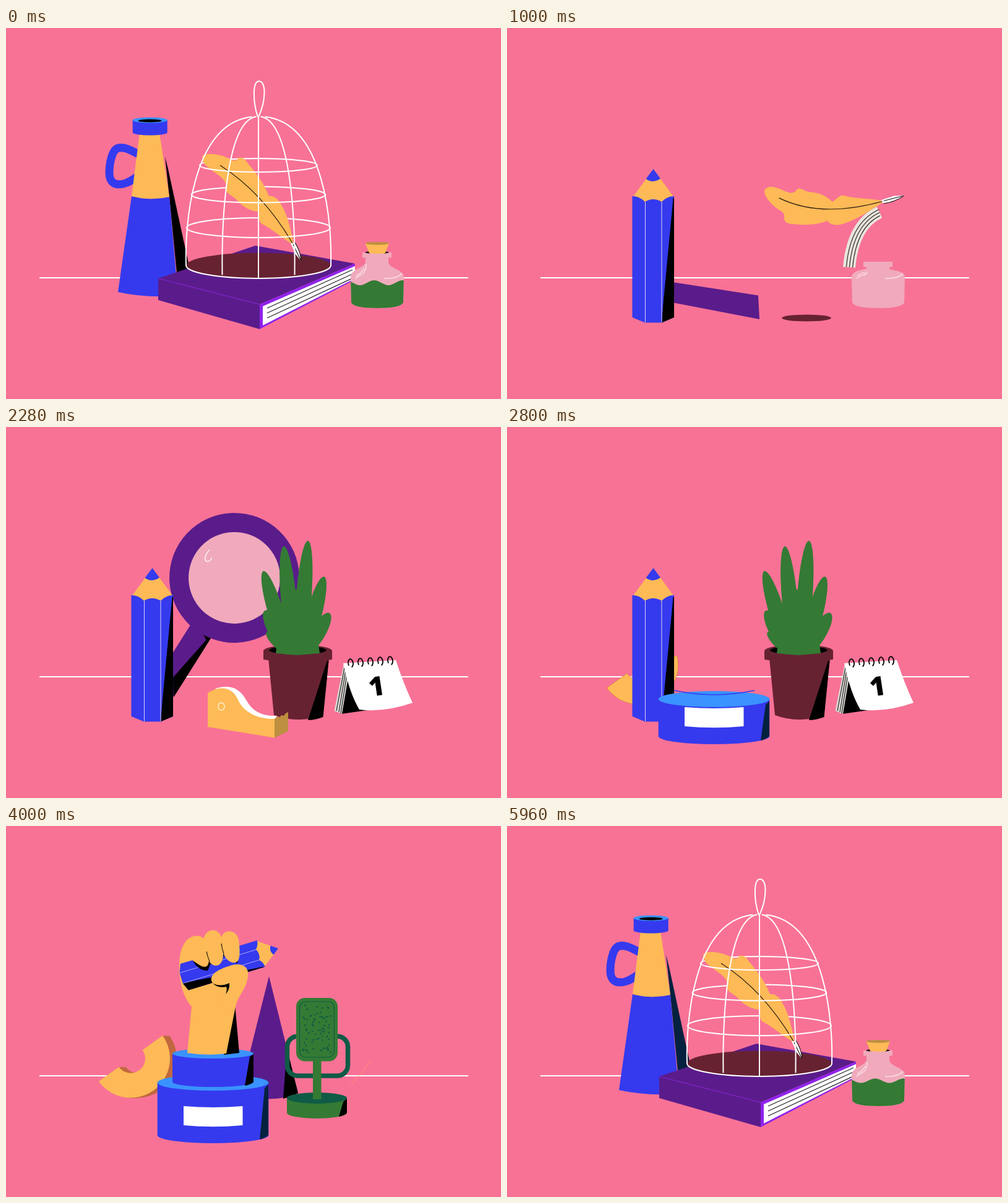
An HTML page with a canvas that plays this animation: 800x600 px, repeating every 6000 ms.

```html
<!DOCTYPE html>
<html lang="en">
<head>
<meta charset="utf-8">
<title>Writer's desk</title>
<style>
html, body { margin: 0; width: 100%; height: 100%; overflow: hidden; background: #f87296; }
canvas { display: block; }
</style>
</head>
<body>
<canvas id="stage" width="800" height="600"></canvas>
<script>
const c = document.getElementById('stage').getContext('2d');
const PINK = '#f87296', BLUE = '#353aee', SKY = '#3a93ff', GOLD = '#fdba56', OCHRE = '#bd8f3f',
  PURPLE = '#5a1c8b', VIOLET = '#9122ec', WINE = '#672232', GREEN = '#347a34', PINE = '#0f5b46',
  GLASS = '#f0aabc', NAVY = '#04213f', RUST = '#c0683f', BLACK = '#000', WHITE = '#fff';
const LOOP = 6000, RAD = Math.PI / 180;
let t = 0, u = 0; // u continues past the loop end for the first set of objects

const lerp = (a, b, k) => a + (b - a) * k;
const span = (v, a, b) => Math.min(1, Math.max(0, (v - a) / (b - a)));
const lin = x => x;
const outQuad = x => 1 - (1 - x) ** 2;
const outCubic = x => 1 - (1 - x) ** 3;
const inOut = x => x < .5 ? 4 * x ** 3 : 1 - (2 - 2 * x) ** 3 / 2;
const outBack = x => 1 + 2.5 * (x - 1) ** 3 + 1.5 * (x - 1) ** 2;
const inBack = x => x * x * (2.1 * x - 1.1);
const tw = (v, a, b, ease = inOut) => ease(span(v, a, b));
const life = (v, a, b, x, y, enter = outBack, leave = inBack) =>
  v < x ? tw(v, a, b, enter) : 1 - tw(v, x, y, leave);

function fill(color, d) { c.fillStyle = color; c.fill(new Path2D(d)); }
function line(color, w, d) { c.strokeStyle = color; c.lineWidth = w; c.stroke(new Path2D(d)); }
function oval(color, x, y, rx, ry) {
  c.fillStyle = color;
  c.beginPath(); c.ellipse(x, y, Math.max(0, rx), Math.max(0, ry), 0, 0, 7); c.fill();
}
function arc(x, y, rx, ry, a, b, w = 2) {
  c.strokeStyle = WHITE; c.lineWidth = w;
  c.beginPath(); c.ellipse(x, y, rx, ry, 0, a, b); c.stroke();
}
function trim(color, w, d, len, k) {
  if (k <= 0) return;
  c.setLineDash([len * k, 2000]);
  line(color, w, d);
  c.setLineDash([]);
}
function grow(x, y, sx, sy, draw) {
  if (sx <= .005 || sy <= .005) return;
  c.save();
  c.translate(x, y); c.scale(sx, sy); c.translate(-x, -y);
  draw();
  c.restore();
}
function drum(side, lid, x, top, bottom, rx, ry) {
  fill(side, `M${x - rx},${top}V${bottom}A${rx},${ry} 0 0 0 ${x + rx},${bottom}V${top}Z`);
  oval(lid, x, top, rx, ry);
}
const quad = p => 'M' + p.map(q => q.join()).join('L') + 'Z';

function megaphone() {
  const s = life(u, 4450, 4680, 6420, 6650);
  grow(234, 430, 1, s, () => {
    const k = life(u, 4620, 5250, 6300, 6480, outQuad, lin);
    trim(BLUE, 13, 'M214,239C204,246 198,250 190,252C176,255 167,250 167,234C167,220 171,196 182,194C192,192 202,198 216,205', 142, k);
    fill(t > 3000 ? NAVY : BLACK, 'M257,208L262,228 297,390 276,397 264,273Z');
    fill(BLUE, 'M203,272Q234,280 264,273L278,433Q225,437 181,427Z');
    fill(GOLD, 'M216,170H248L264,273Q234,280 203,272Z');
    const h = life(u, 4580, 4980, 6330, 6480, outQuad);
    const top = lerp(169, 149, h);
    if (h > .02) {
      drum(BLUE, SKY, 232.7, top, 169, 28, 4.5);
      oval(BLACK, 232.7, top + 1, 19, 2.6);
    }
  });
}

function book() {
  if (u > 7040) return;
  const top = life(u, 4660, 5060, 6400, 6680, outQuad, inOut);
  const pages = life(u, 4540, 4700, 6560, 6780, outQuad, inOut);
  const face = tw(u, 4450, 4650, outCubic), fold = tw(u, 6600, 6960);
  if (top > 0) {
    const dx = 157 * top, dy = -53 * top, ry = -66 * top;
    fill(PURPLE, quad([[246, 405], [246 + dx, 405 + dy], [410 + 154 * top, 447 + ry], [410, 447]]));
  }
  if (pages > 0) {
    grow(410, 447, pages, lerp(.6, 1, pages), () => {
      fill(VIOLET, 'M410,447L564,381V407L410,487Z');
      fill(WHITE, 'M415,450L564,385V405L415,481Z');
      for (let y = 453; y < 475; y += 8) line('#222', 1.2, `M422,${y}L560,${391 + (y - 453) * .85}`);
    });
  }
  if (face > 0) {
    const from = [[246, 405], [410, 447], [410, 487], [246, 440]];
    const to = [[258, 409.5], [406, 432.5], [408, 471], [252, 441]];
    const p = from.map((q, i) => [lerp(246, lerp(q[0], to[i][0], fold), face),
      lerp(i < 2 ? 405 : 440, lerp(q[1], to[i][1], fold), face)]);
    fill(PURPLE, quad(p));
    if (fold === 0) line(VIOLET, .8, `M${p[0]}L${p[1]}`);
  }
}

function feather() {
  const turn = tw(u, 6450, 7000), fly = span(u, 7000, 7340);
  const s = tw(u, 4930, 5420, outBack) * lerp(1, .97, turn) * (1 - fly ** 3);
  if (s <= .01) return;
  const cos = Math.cos(46.6 * RAD), sin = Math.sin(46.6 * RAD);
  // flips the plume across its axis and bows it as it turns
  const warp = d => d.replace(/([\d.]+),([\d.]+)/g, (_, px, py) => {
    const x = px - 476, y = py - 376;
    const along = x * cos + y * sin, across = y * cos - x * sin;
    const a = 231 + along;
    const slide = 14 * turn * Math.sin(Math.PI * span(a, 0, 231));
    const bow = 10 * turn * Math.sin(Math.PI * span(a, 30, 205));
    return `${along - slide},${across * lerp(1, -1.08, turn) + bow}`;
  });
  c.save();
  c.translate(lerp(476, 640, turn) + 135 * fly, lerp(376, 271, turn) + 8 * fly);
  c.rotate((lerp(46.6, 2.3, turn) - 25 * (1 - tw(u, 4930, 5500, outBack))) * RAD);
  c.scale(s, s);
  fill(GOLD, warp('M465,350C452,345 432,326 414,317C407,313 410,303 408,297C395,296 383,290 372,277C362,268 353,267 356,258C357,248 348,241 338,234C326,225 317,220 317,208C321,201 346,203 364,213C370,216 374,214 376,210C382,208 387,213 391,219C405,236 417,251 425,272C432,271 440,276 445,286C456,304 461,330 465,350Z'));
  fill(WHITE, warp('M460,348L467,347Q476,361 477,377L468,366Z'));
  line('#2a1a10', 1.2, warp('M346,222Q415,266 463,348'));
  line(BLACK, 1, warp('M464,350L476,375M467,347Q476,361 477,377'));
  c.restore();
}

function sheet() {
  const s = life(u, 6740, 6960, 7020, 7230, outBack, lin);
  grow(552, 400, s, s, () => {
    const curve = o => `M${553 + o},${387 + o * .14}Q${559 + o},${318 + o * .7} ${602 + o * .15},${298 + o}`;
    line('#e8e4dc', 20, curve(0));
    [-4.5, .5, 5.5].forEach(o => line('#222', 1.1, curve(o)));
  });
}

function cage() {
  if (u > 7060 || u < 4400) return;
  const move = tw(u, 6500, 6960), k = tw(u, 4560, 4880, lin);
  oval(WINE, lerp(408, 484, move), lerp(384, 469, move), lerp(117, 40, move) * k, lerp(20.5, 5.5, move) * k);

  const rise = life(u, 4720, 5060, 6320, 6580, outBack, inOut);
  const on = u > 4540 && u < 6720;
  const rings = [[222, 95, 11], [269.5, 108.5, 13], [323, 116, 16]].map(r =>
    [lerp(383, r[0], rise), lerp(117, r[1], rise), lerp(21, r[2], rise)]);
  if (on) rings.forEach(r => arc(408, ...r, Math.PI, 2 * Math.PI));
  sheet();
  feather();
  if (!on) return;
  rings.forEach(r => arc(408, ...r, 0, Math.PI));
  arc(408, 384, 117, 21, 0, Math.PI);
  const ribs = [[-1, 4610], [-.5, 4505], [0, 4465], [.5, 4442], [1, 4430]];
  ribs.forEach(([w, at], i) => {
    const base = 384 + 20 * (1 - Math.abs(w)) ** .4;
    const x = m => 408 + w * m;
    const d = `M${x(117)},${base}C${x(119)},320 ${x(108)},143 408,143`;
    const len = [285, 272, 261, 272, 285][i];
    trim(WHITE, 2, d, len, life(u, at, at + 300, 6420 + i * 15, 6640 + i * 15, lin, inOut));
  });
  trim(WHITE, 2, 'M407,144C399,120 398,86 409,86C421,86 420,118 408,144', 125,
    life(u, 4880, 5090, 6300, 6450, outQuad, inOut));
}

function bottle() {
  const s = life(u, 4440, 4680, 7020, 7240);
  grow(600, 453, lerp(.7, 1, Math.min(1, s)), s, () => {
    const n = 15 * (1 - life(u, 4800, 5120, 6450, 6900, outBack, inOut));
    const body = `M581,${370 + n}V${377 + n * .75}C581,${389 + n * .2} 557,${388 + n * .1} 557,404L558,444Q562,453 600,453Q638,453 642,444L643,402C642,${390 + n * .1} 618,${389 + n * .2} 618,${378 + n * .75}V${370 + n}Z`;
    fill(GLASS, body);
    fill(GLASS, `M576,${363 + n}H623V${371.5 + n}H576Z`);
    const full = life(u, 4480, 4700, 6400, 6850, outQuad, inOut);
    if (full > 0) {
      oval(BLACK, 599.5, 363 + n, 19, 2);
      oval(GLASS, 599.5, 363.5 + n, 13, 2.4);
      const level = lerp(456, lerp(419, 412, tw(u, 4700, 5000)), full);
      const amp = 4 + 1.5 * Math.sin(t / LOOP * 12 * Math.PI);
      c.save();
      c.clip(new Path2D(body));
      c.fillStyle = GREEN;
      c.beginPath();
      for (let x = 555; x <= 645; x += 2) c.lineTo(x, level + amp * Math.sin((x - 560.5) / 46 * 2 * Math.PI));
      c.lineTo(645, 460); c.lineTo(555, 460);
      c.fill();
      c.restore();
    }
    line('#fde6ec', 1.3, `M565,405C571,398 582,401 582,${382 + n * .8}M566,401Q576,395 579,${388 + n * .5}M611,405Q632,406 640,397`);
    const k = life(u, 5050, 5300, 6330, 6500);
    grow(600, 362 + n, k, k, () => {
      fill(GOLD, 'M580.5,348H619L613,364Q600,366 587,364Z');
      oval(OCHRE, 599.8, 348.3, 19, 2.4);
    });
  });
}

function magnifier() {
  if (t < 1040 || t > 2760) return;
  const swing = life(t, 1040, 1480, 2350, 2640, outBack, inBack);
  const g = life(t, 1080, 1420, 2400, 2610, outBack, inBack);
  const len = 153 * (1 - tw(t, 2560, 2740));
  c.save();
  c.translate(255, 425);
  c.rotate(lerp(9.4, -57.8, swing) * RAD);
  c.fillStyle = PURPLE;
  c.fillRect(0, -19.5, len, 39);
  if (g > .01) {
    c.globalAlpha = Math.min(1, Math.max(0, swing));
    fill(BLACK, 'M111,4L115,20 -2,20 25,2 105,15Z');
    c.globalAlpha = 1;
    const x = lerp(150, 214, g);
    oval(PURPLE, x, 0, 105 * g, 105 * g);
    oval(GLASS, x, 0, 74 * g, 74 * g);
    if (g > .95) line(WHITE, 1.3, 'M231,-58C222,-60 211,-58 213,-51Q216,-47 222,-48');
  }
  c.restore();
}

function pencil() {
  const s = tw(t, 600, 940, outBack);
  if (s <= 0 || t > 4600) return;
  const e = tw(t, 2950, 3600);
  c.save();
  c.translate(lerp(236.5, 440, e), lerp(228, 198, e) - 100 * Math.sin(Math.PI * e) + 249 * (1 - s));
  c.rotate(73 * e * RAD);
  c.scale(lerp(1, .66, e), lerp(1, .66, e) * s);
  c.translate(-236.5, -228);
  fill(GOLD, 'M203,274L236.5,228 270,274 250,284H223Z');
  fill(BLUE, 'M236.5,228L248,243.5Q236,252 224.5,244Z');
  fill(BLUE, 'M202.5,272Q214,272 223,281Q236,273 250,281Q259,272 270,272V468L250,476.5H223L202.5,468Z');
  fill(BLACK, 'M270,274V468L250,476.5 253,440 268.5,276Z');
  line('#dcd0f8', 1, 'M223.5,281V476M250,281V476');
  c.restore();
}

function tape() {
  grow(390, 500, 1, life(t, 1200, 1500, 2440, 2650), () => {
    fill(WHITE, 'M338,423C364,415 378,424 388,441C398,460 414,468 438,467L434,474 400,472 365,440Z');
    fill(GOLD, 'M326,430C347,417 366,421 375,441C383,461 408,473 434,472V502.5L326,485Z');
    fill(OCHRE, 'M434,472L439,468 442,470 445,466 449,467 452,463 456,461V492L434,502.5Z');
    c.strokeStyle = '#fff0d0'; c.lineWidth = 1.4;
    c.beginPath(); c.ellipse(348, 452, 5.2, 6.2, 0, 0, 7); c.stroke();
  });
}

function plant() {
  grow(472, 474, 1, life(t, 1050, 1370, 3000, 3200), () => {
    fill(WINE, 'M424,374L433,466Q470,480 512,467L522,374Z');
    fill(BLACK, 'M521.5,378L512.5,469Q500,474 488,474L519,378Z');
    fill(WINE, 'M416,362V376Q470,386 527,376V362Z');
    oval(WINE, 471.5, 362, 55.5, 10);
    oval(BLACK, 471.5, 361, 46.5, 6.8);
    const open = tw(t, 1620, 1960, outBack);
    const g = (.77 + .23 * open) * life(t, 1220, 1520, 2880, 3080);
    if (g <= .01) return;
    const s = .45 + .55 * open;
    const at = (x, y) => [470 + (x - 470) * s, 367 + (y - 367) * g];
    c.fillStyle = GREEN;
    const tips = [[416, 233], [449, 193], [488, 184], [514, 242], [523, 301], [418, 297], [421, 332]];
    tips.forEach(([x, y]) => {
      // the folded plant leans left
      const lean = (y - 367) * .055 * (1 - open);
      const [ax, ay] = at(470 + (x - 470) * .25, 367), [bx, by] = at(x + lean, y + (x > 470 ? 22 * (1 - open) : 0));
      c.beginPath();
      c.ellipse((ax + bx) / 2, (ay + by) / 2, Math.hypot(bx - ax, by - ay) / 2, y > 320 ? 8 : 12.5,
        Math.atan2(by - ay, bx - ax), 0, 7);
      c.fill();
    });
    fill(GREEN, quad([at(436, 366), at(446, 292), at(468, 262), at(497, 290), at(507, 366), at(470, 369)]));
  });
}

function calendar() {
  grow(590, 462, 1, life(t, 1180, 1500, 2950, 3180), () => {
    fill(BLACK, 'M546,392L584,458 542,464Z');
    fill('#dcdad6', 'M546,383L530.5,459 543,464 553,405Z');
    line('#222', 1.2, 'M547,389L534,459M549,393L538,461M551,399L541,463');
    fill(WHITE, 'M545,382L630,377Q642,414 657,446Q612,462 571,457Q555,430 545,382Z');
    c.strokeStyle = BLACK; c.lineWidth = 1.8;
    for (let i = 0; i < 5; i++) {
      c.beginPath();
      c.ellipse(557 + i * 16, 382 - i, 3.8, 6.8, -.1, 2.6, 7.6);
      c.stroke();
    }
    c.save();
    c.translate(599, 418); c.rotate(-.15);
    c.fillStyle = BLACK; c.font = '800 43px "Open Sans", Lato, sans-serif';
    c.textAlign = 'center'; c.fillText('1', -.5, 16.5);
    c.restore();
  });
}

function halfRing() {
  const k = life(t, 2600, 3000, 4400, 4620, outCubic, inOut);
  if (k <= .01) return;
  const m = tw(t, 2750, 3150);
  const x = lerp(213, 201.5, m), y = lerp(385, 376, m);
  const end = 144.3 * RAD, start = lerp(144.3, -35.7, k) * RAD;
  const half = (dx, color) => {
    c.fillStyle = color;
    c.beginPath();
    c.arc(x + dx, y, 63.5, start, end);
    c.arc(x + dx, y, 23.5, end, start, true);
    c.fill();
  };
  if (m > 0) for (let d = 11; d > 0; d -= 1) half(d * m, RUST);
  half(0, GOLD);
}

function cone() {
  grow(425, 440, 1, life(t, 2980, 3400, 4400, 4600), () => {
    fill(PURPLE, 'M425,243L472,432Q440,447 392,438L378,430Z');
    fill(BLACK, 'M454,360L472,432Q462,438 448,441Z');
  });
}

const dots = [];
for (let i = 0, seed = 7; i < 75; i++) {
  const rnd = () => (seed = seed * 16807 % 2147483647) / 2147483647;
  dots.push([480 + 45 * rnd(), 290 + 79 * rnd()]);
}
function box(x, y, w, h, r) { c.beginPath(); c.roundRect(x, y, w, h, r); }
function mic() {
  const s = life(t, 3150, 3600, 4380, 4580);
  grow(502, 472, 1, s, () => {
    drum(GREEN, PINE, 502.5, 440, 464, 48.5, 9);
    fill(BLACK, 'M551,441V464Q547,468 538,470L545,446Z');
    c.strokeStyle = PINE; c.lineWidth = 7.5;
    box(454.5, 340, 98, 64, 17); c.stroke();
    c.fillStyle = GREEN;
    c.fillRect(496, 376, 13.5, 66);
    box(469, 278, 67, 102.5, 14); c.fill();
    c.strokeStyle = PINE; c.lineWidth = 1.2;
    box(474.5, 284, 56, 90, 10); c.stroke();
    dots.forEach(([x, y]) => oval(PINE, x, y, 1.3, 1.3));
  });
}

function pedestal() {
  const out = 1 - tw(t, 4430, 4610, inBack);
  const g = tw(t, 2667, 3067, outCubic);
  if (g <= 0 || t > 4610) return;
  grow(334.5, 514, 1, out, () => {
    const top = lerp(500, 415, g);
    drum(BLUE, SKY, 334.5, top, 500, 89.8, 13);
    fill(NAVY, `M424,${top + 3}V500Q419,505 410,507L418,${top + 9}Z`);
    const label = tw(t, 2660, 2790);
    grow(334, 453, 1, label, () => fill(WHITE, 'M287,453Q335,457 382.5,453V484Q335,488.5 287,484Z'));
    const h = tw(t, 2800, 3150, outBack);
    if (t > 2760 && h < .04) line(BLUE, 1.6, 'M270,426Q335,440 400,426');
    else if (h > 0) {
      const lid = lerp(414, 368, h);
      drum(BLUE, SKY, 334.5, lid, 414, 65.5, 8);
      fill(BLACK, `M400,${lid + 1}V414Q396,418 386,420L394,${lid + 5}Z`);
    }
  });
}

function fist() {
  const rise = tw(t, 3100, 3560, outBack), s = 1 - tw(t, 4350, 4550, inBack);
  const arm = draw => {
    if (rise <= 0) return;
    c.save();
    c.beginPath(); c.rect(0, 0, 800, 371); c.clip();
    c.translate(0, 210 * (1 - rise));
    draw();
    c.restore();
  };
  grow(335, 368, s, s, () => {
    arm(() => {
      fill(BLACK, 'M370,288L377,367 352,370Z');
      fill(GOLD, 'M293,367L300,292C281,270 278,236 281,212C284,186 300,174 316,180L372,200 391,236C390,264 374,274 371,292L356,368Q325,372 293,367Z');
    });
    pencil();
    arm(() => {
      fill(BLACK, 'M301,216Q310,234 326,234L330,224 352,208 374,222 377,208Z');
      fill(GOLD, 'M283,222C280,190 296,174 314,178Q318,181 319,184C322,164 344,164 348,180C352,166 373,167 376,184C378,198 379,214 374,219C366,225 355,217 351,205C352,230 334,230 328,218C326,238 309,222 301,217Z');
      line(BLACK, 1, 'M324,203Q326,212 329,219M348,190Q349,198 352,207');
      fill(GOLD, 'M332,250C330,240 342,232 362,226C378,220 394,226 391,243C388,266 374,275 371,292H340L345,262Q334,258 332,250Z');
      fill(BLACK, 'M334,254Q345,261 361,254Q362,264 355,272Q358,264 356,260Q342,263 334,254Z');
    });
  });
}

function frame() {
  c.fillStyle = PINK;
  c.fillRect(0, 0, 800, 600);
  line(WHITE, 2, 'M54,404H747');
  u = t < 1500 ? t + LOOP : t;
  megaphone();
  halfRing();
  cone();
  magnifier();
  book();
  if (u < 7060) cage(); else { sheet(); feather(); }
  plant();
  if (t > 3860 && t < 4080) line('#ff9968', .8, 'M557,421L589,380');
  mic();
  if (t < 2950) pencil();
  pedestal();
  if (t >= 2950 && t < 4600) fist();
  tape();
  calendar();
  bottle();
}

const begin = performance.now();
function tick(now) {
  t = Math.max(0, now - begin) % LOOP;
  frame();
  requestAnimationFrame(tick);
}
frame();
requestAnimationFrame(tick);
</script>
</body>
</html>
```
